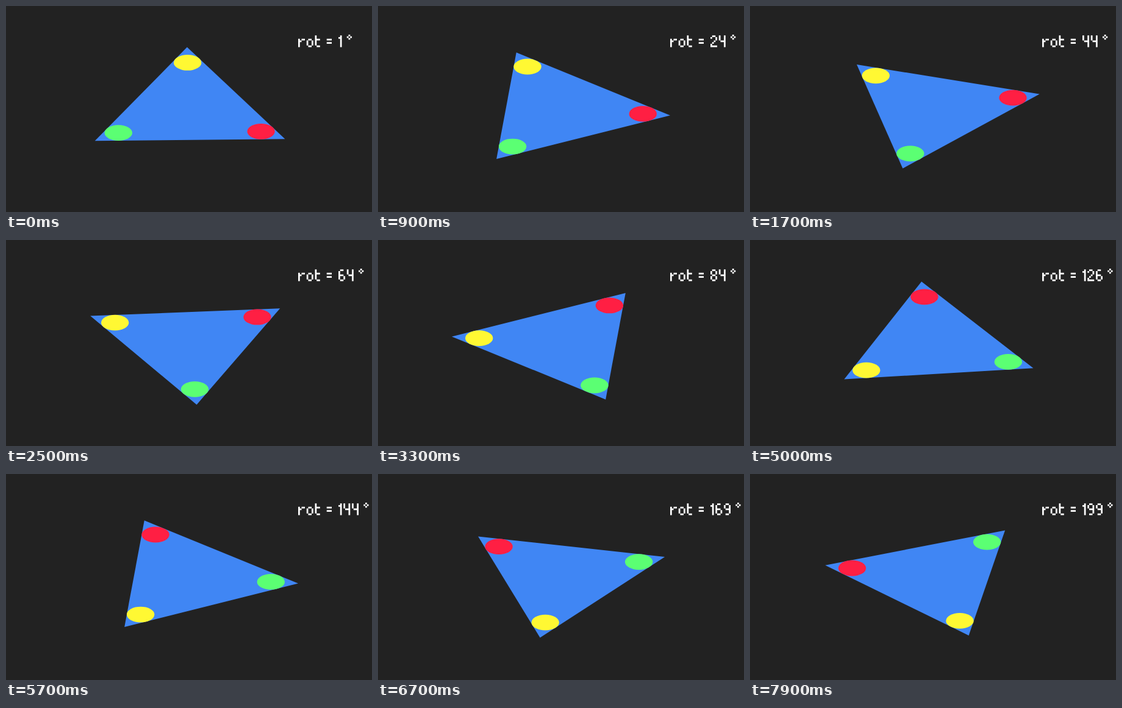
An HTML page that plays this animation: 600 px wide and 338 px high, repeating every 8000 ms.

```html
<!DOCTYPE html>
<html lang="en">
<head>
<meta charset="utf-8">
<title>Rotating triangle</title>
<style>
  html, body { margin: 0; width: 100%; height: 100%; overflow: hidden; background: #222; }
  svg { display: block; width: 600px; height: 338px; }
  #label { fill: none; stroke: #fff; stroke-linecap: square; }
</style>
</head>
<body>
<svg viewBox="0 0 600 338">
  <polygon id="triangle" fill="#4086f4"/>
  <ellipse class="dot" rx="22.7" ry="12.9" fill="#fff833"/>
  <ellipse class="dot" rx="22.7" ry="12.9" fill="#5bff73"/>
  <ellipse class="dot" rx="22.7" ry="12.9" fill="#ff1f43"/>
  <g id="label" role="img" transform="translate(479 48.25) scale(2.75) translate(.5 .5)"></g>
</svg>
<script>
// Pixel lettering: strokes on a grid seven cells tall
const glyphs = {
  0: 'M1 0h1M0 1v4M3 1v4M1 6h1',
  1: 'M1 0v6M0 1h0',
  2: 'M0 1h0M1 0h1M3 1v1M2 3h0M1 4h0M0 5h0M0 6h3',
  3: 'M0 1h0M1 0h1M3 1v1M1 3h1M3 4v1M1 6h1M0 5h0',
  4: 'M0 0v2M3 0v6M1 3h2',
  5: 'M3 0h-3v2h2M3 3v2M1 6h1M0 5h0',
  6: 'M1 0h1M0 1v4M1 3h1M3 4v1M1 6h1',
  7: 'M0 0h3v2M2 3v1M1 5v1',
  8: 'M1 0h1M0 1v1M3 1v1M1 3h1M0 4v1M3 4v1M1 6h1',
  9: 'M1 0h1M0 1v1M3 1v4M1 3h1M1 6h1',
  r: 'M0 2v4M1 3h0M2 2h1',
  o: 'M1 2h1M0 3v2M3 3v2M1 6h1',
  t: 'M0 0v5M0 2h2M1 6h1',
  '=': 'M0 2h2M0 4h2',
  '°': 'M3 -.5h0M2 .5h0M4 .5h0M3 1.5h0',
  ' ': ''
};
const advance = { 1: 3, t: 4, '=': 4, ' ': 3 };

const triangle = document.getElementById('triangle');
const label = document.getElementById('label');
const dots = document.querySelectorAll('.dot');
let shown = '';

function write(text) {
  if (text === shown) return;
  shown = text;
  let x = 0, out = '';
  for (const c of text) {
    out += `<path transform="translate(${x})" d="${glyphs[c]}"/>`;
    x += advance[c] || 5;
  }
  label.innerHTML = out;
  label.setAttribute('aria-label', text);
}

// The stage maps a unit square to 600 by 338, so circles become ellipses
function place(radius, degrees) {
  const a = degrees * Math.PI / 180;
  return [300 + 300 * radius * Math.cos(a), 169 - 169 * radius * Math.sin(a)];
}

function draw() {
  const step = Math.floor(performance.now() % 8000 / 100);
  const rot = Math.floor(1.5 + 2.5 * step);
  const angles = [90, 210, 330].map(a => a + rot);
  triangle.setAttribute('points', angles.map(a => place(.6, a)).join(' '));
  dots.forEach((dot, i) => {
    const [x, y] = place(.45, angles[i]);
    dot.setAttribute('cx', x);
    dot.setAttribute('cy', y);
  });
  write(`rot = ${rot}°`);
  requestAnimationFrame(draw);
}
draw();
</script>
</body>
</html>
```
